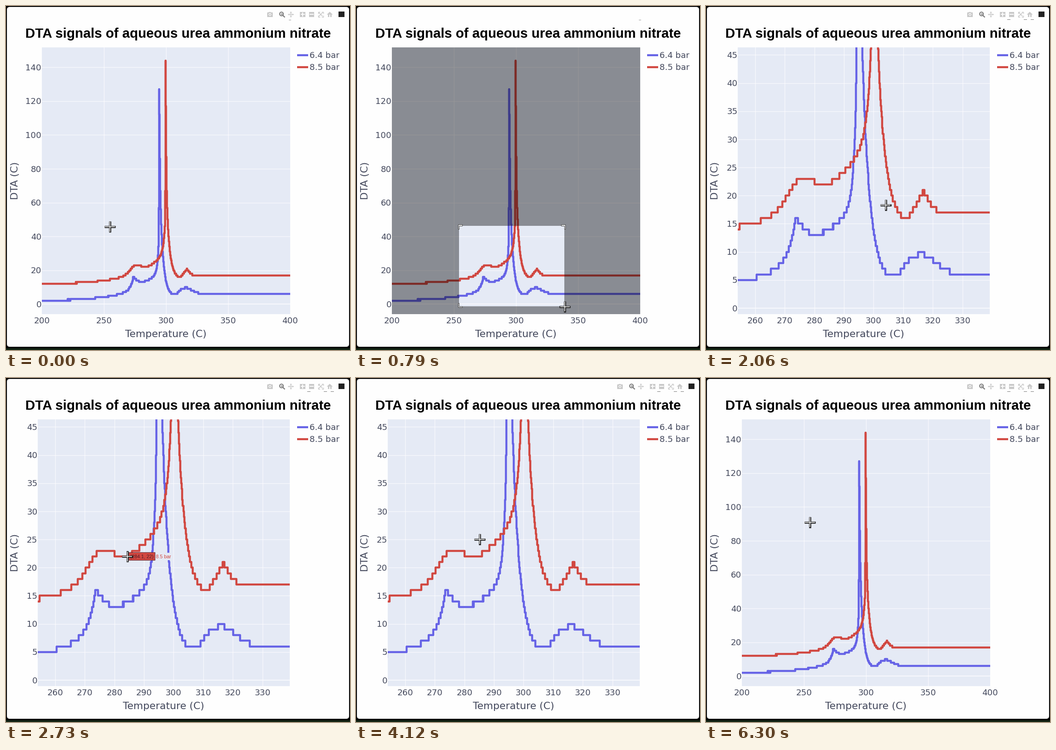
A matplotlib script for the animation above (6.33 s loop, 748 px wide and 748 px high).

```python
import numpy as np
import matplotlib.pyplot as plt
from matplotlib.animation import FuncAnimation
from matplotlib.patches import Circle, FancyBboxPatch, PathPatch, Polygon, Rectangle
from matplotlib.path import Path

SIZE, DPI = 748, 64
PT = 72 / DPI  # points per pixel
STEP, LOOP = 30, 6330
RELEASE, RESET = 1200, 5250

BLUE, RED, INK = "#6663e6", "#d14841", "#43485c"
PLOT, PANEL, GREY, MID = "#e5eaf5", "#fefefe", "#c9c9c9", "#7b7b7b"

fig = plt.figure(figsize=(SIZE / DPI, SIZE / DPI), dpi=DPI, facecolor="black")
ax = fig.add_axes([0, 0, 1, 1])
ax.set(xlim=(0, SIZE), ylim=(SIZE, 0))
ax.axis("off")


def line(xs, ys, color, width, z=2, **kw):
    return ax.plot(xs, ys, color=color, lw=width * PT, zorder=z, **kw)[0]


def rect(x, y, w, h, color, z=1):
    return ax.add_patch(Rectangle((x, y), w, h, fc=color, lw=0, zorder=z))


def disc(x, y, r, color, z):
    return ax.add_patch(Circle((x, y), r, fc=color, lw=0, zorder=z))


def text(x, y, s, size, color=INK, ha="left", family="DejaVu Sans", z=4, **kw):
    return ax.text(x, y, s, fontsize=size * PT, color=color, ha=ha,
                   va="baseline", family=family, zorder=z, **kw)


def closed(*polys):
    return Path.make_compound_path(
        *[Path(list(p) + [p[0]], closed=True) for p in polys])


def box(x0, y0, x1, y1):
    return [(x0, y0), (x1, y0), (x1, y1), (x0, y1)]


# ---- signals ----

TEMPS = np.arange(200, 400, .05)
rng = np.random.default_rng(4)


def bump(mid, height, left, right, power):
    d = TEMPS - mid
    return height * np.exp(-np.abs(d / np.where(d < 0, left, right)) ** power)


def signal(apex, low, rise, shoulder, dip, lift, lift_at, fall, hump):
    """Exponential run-up and cooling around a sharp apex, read in whole degrees."""
    d = TEMPS - apex
    up, down = np.minimum(d, 0), np.maximum(d, 0)
    heating = low + sum(h * np.exp(up / w) for h, w in rise) + bump(*shoulder)
    cooling = (dip + lift / (1 + np.exp((lift_at - TEMPS) / .8))
               + sum(h * np.exp(-down / w) for h, w in fall) + bump(*hump))
    noise = np.repeat(rng.normal(0, .035, len(TEMPS) // 5), 5)
    return np.rint(np.where(d < 0, heating, cooling) + noise).astype(int)


blue = signal(
    apex=294.45, low=1.9, rise=[(17.1, 21.7), (27.6, .98), (80, .12)],
    shoulder=(273.7, 7.9, 2.2, 5.6, 1), dip=4.1, lift=1.9, lift_at=309.3,
    fall=[(75, 2.7), (48, .55)], hump=(316.1, 3.55, 6.9, 6.9, 2))
red = signal(
    apex=299.6, low=11.5, rise=[(18.9, 24.3), (22.7, 1.43), (91, .12)],
    shoulder=(275.3, 4.6, 6.1, 6.1, 2), dip=14.6, lift=2.4, lift_at=312.7,
    fall=[(60, 2.75), (69, .5)], hump=(316.8, 3.6, 2.6, 2.6, 1.4))
SIGNALS = [(blue, BLUE, "6.4 bar"), (red, RED, "8.5 bar")]


# ---- page ----

ax.add_patch(FancyBboxPatch((8, 8), 732, 727, fc=PANEL, lw=0, zorder=0,
                            boxstyle="round,pad=6,rounding_size=6"))
line([0, SIZE], [745.5, 745.5], "#28502b", 1.5)
text(374, 69, "DTA signals of aqueous urea ammonium nitrate", 29.4, "black",
     "center", "Liberation Sans", weight="bold")
text(26, 379.5, "DTA (C)", 21.8, ha="center", rotation=90, rotation_mode="anchor")
for y, (_, color, label) in zip((106.5, 132.5), SIGNALS):
    line([633, 657], [y, y], color, 4.4, solid_capstyle="butt")
    text(660.5, y + 6.6, label, 18.2)


# ---- the two zoom levels ----

def full_xy(t, v):
    return 78 + 2.7 * (t - 200), 648.2 - 3.678 * v


def zoom_xy(t, v):
    return 364.5 + 6.44 * (t - 300), 657 - 12.235 * v


def view(to_xy, x0, x1, xticks, yticks, right, middle):
    bg = rect(x0, 90, x1 - x0, 580, PLOT)
    parts = [bg, text(middle, 720, "Temperature (C)", 21.8, ha="center")]
    for t in xticks:
        x = to_xy(t, 0)[0]
        parts.append(text(x, 689.5, str(t), 18.2, ha="center"))
        if x0 + 2 < x < x1 - 2:
            parts.append(line([x, x], [90, 670], "white", 1.4, alpha=.7))
    for v in yticks:
        y = to_xy(0, v)[1]
        parts.append(text(right, y + 6.6, str(v), 18.2, ha="right"))
        parts.append(line([x0, x1], [y, y], "white", 1.4 if v else 2, alpha=.7))
    for vals, color, _ in SIGNALS:
        keep = np.flatnonzero(np.diff(vals, prepend=-1))
        keep = np.append(keep, len(vals) - 1)
        curve = line(*to_xy(TEMPS[keep], vals[keep]), color, 4.4, 3,
                     drawstyle="steps-post", solid_joinstyle="round")
        curve.set_clip_path(bg)
        parts.append(curve)
    return parts


full = view(full_xy, 78, 618, range(200, 401, 50), range(0, 141, 20), 77, 347.5)
zoom = view(zoom_xy, 69, 617, range(260, 331, 10), range(0, 46, 5), 68.5, 343)

# leftovers of covered text above the title
before = [line([615, 619], [29.5, 29.5], "#999", 1)]
after = [line([x, x + 6], [29, 29], MID, 1) for x in (655, 691, 706)]


# ---- toolbar ----

def plus(x, y, r, color, width):
    return [line([x - r, x + r], [y, y], color, width, 6),
            line([x, x], [y - r, y + r], color, width, 6)]


CY = 18.4
bar = [
    rect(568, 14, 12, 9.5, GREY, 5), rect(571.5, 12.5, 5, 2, GREY, 5),
    disc(574, CY, 3, PANEL, 6), disc(574, CY, 1.7, GREY, 7),
    disc(599, 17.3, 5, MID, 5), disc(599, 17.3, 3, PANEL, 5.5),
    line([602, 605.5], [20.3, 23.8], MID, 2.3, 5),
    *plus(599, 17.3, 1.8, MID, 1),
    *plus(619.5, CY, 5, GREY, 1.4),
    rect(639.5, 12.8, 11.5, 11.5, GREY, 5), *plus(645.2, CY, 3.5, PANEL, 2),
    rect(658.8, 12.8, 11.5, 11.5, GREY, 5),
    line([661, 668], [CY, CY], PANEL, 2, 6),
    ax.add_patch(Polygon([(697.5, 18.6), (704, 12.6), (710.5, 18.6)],
                         fc=GREY, lw=0, zorder=5)),
    rect(699.7, 18, 3, 6, GREY, 5), rect(705.2, 18, 3, 6, GREY, 5),
    rect(723, 12, 13, 12, "#222222", 5),
]
for mark, dx, dy in [("<", -5, 0), (">", 5, 0), ("^", 0, -5), ("v", 0, 5)]:
    bar.append(line([619.5 + dx], [CY + dy], GREY, 0, 6, marker=mark,
                    ms=4 * PT, mew=0))
for sx in (-1, 1):
    bar.append(line([684.3 - 3.7 * sx, 684.3 + 3.7 * sx], [CY - 3.7, CY + 3.7], GREY, 1.5, 5))
    for sy in (-1, 1):
        x, y = 684.3 + 5.5 * sx, CY + 5.5 * sy
        bar.append(line([x - 3 * sx, x, x], [y, y, y - 3 * sy], GREY, 1.4, 5))


# ---- selection, hover label, cursor ----

dim = ax.add_patch(PathPatch(closed(box(0, 0, 1, 1)), fc="black", lw=0, zorder=8))
corners = ax.add_patch(PathPatch(closed(box(0, 0, 1, 1)), fc="white", ec="#444",
                                 lw=PT, zorder=9))

name_bg = rect(0, 0, 37, 16, PLOT, 8)
tag = ax.add_patch(Polygon(box(0, 0, 1, 1), ec="#5a2a35", lw=PT, zorder=9))
value = text(0, 0, "", 10.5, "#4f1d26", "center", "Liberation Sans", 10)
name = text(0, 0, "", 10.5, family="Liberation Sans", z=10)
hover = [name_bg, tag, value, name]

cross = [(line([], [], color, w, 12, solid_capstyle="butt"), r, upright)
         for color, w, r in (("#1c1c1c", 4.5, 12), ("white", 1.5, 10.6))
         for upright in (False, True)]

START, END = np.array([226, 480]), np.array([454.5, 653.5])
# time, x, y of the turns made while reading the zoomed plot
TURNS = np.array([(1250, *END), (2060, 389, 427), (2650, 258, 394),
                  (3330, 305, 347), (3560, 328, 325), (4000, 275, 356),
                  (4900, 226, 313.5)]).T


def pointer(t):
    if t < TURNS[0, 0]:
        left = 1 - np.clip((t - 30) / 650, 0, 1)
        return START + (END - START) * (1 - left ** np.array([2.3, 3.7]))
    return np.array([np.interp(t, TURNS[0], TURNS[k]) for k in (1, 2)])


def show(parts, on):
    for p in parts:
        p.set_visible(on)


def draw_selection(t):
    x0, y0 = START - (1.7, 2.5)
    x1, y1 = pointer(t - 32) - (1.5, 1)
    on = t < RELEASE and x1 - x0 > 6
    show([dim, corners], on)
    if not on:
        return
    dim.set_path(closed(box(78, 90, 618, 670), box(x0, y0, x1, y1)[::-1]))
    dim.set_alpha(.4 * np.interp(t, [45, 190], [0, 1]))
    arm = min(7, (x1 - x0) / 3, (y1 - y0) / 3)
    bracket = [(-2.5, -2.5), (arm, -2.5), (arm, 0), (0, 0), (0, arm), (-2.5, arm)]
    corners.set_path(closed(*[
        [(x + sx * a, y + sy * b) for a, b in bracket]
        for x, sx in ((x0, 1), (x1, -1)) for y, sy in ((y0, 1), (y1, -1))]))


def draw_hover(x, y, zoomed):
    reach, hit = 14, None
    for vals, color, label in SIGNALS:
        xs, ys = zoom_xy(TEMPS, vals)
        d = np.hypot(xs - x, ys - y)
        i = d.argmin()
        if zoomed and d[i] < reach:
            reach, hit = d[i], (xs[i], ys[i], TEMPS[i], vals[i], color, label)
    show(hover, hit is not None)
    if hit is None:
        return
    px, py, temp, val, color, label = hit
    left, right = px + 5, px + 62
    tag.set_xy([(px, py), (left, py - 4), (left, py - 8.5), (right, py - 8.5),
                (right, py + 8.5), (left, py + 8.5), (left, py + 4)])
    tag.set_facecolor(color)
    value.set_text(f"({temp:.1f}, {val})")
    value.set_position(((left + right) / 2, py + 3.8))
    name.set_text(label)
    name.set_color(color)
    name.set_position((right + 2, py + 3.8))
    name_bg.set_xy((right, py - 8))


def update(i):
    t = i * STEP
    zoomed = RELEASE <= t < RESET
    show(zoom, zoomed)
    show(full, not zoomed)
    show(before, t < RELEASE)
    show(after, t >= RELEASE)

    fade = np.interp(t, [30, 240, RELEASE, RELEASE + 210], [1, 0, 0, 1])
    for part in bar:
        part.set_alpha(fade)

    x, y = pointer(t)
    draw_selection(t)
    draw_hover(x - 1.5, y - 2, zoomed)
    for arm, r, upright in cross:
        if upright:
            arm.set_data([x, x], [y - r, y + r])
        else:
            arm.set_data([x - r, x + r], [y, y])
    return []


anim = FuncAnimation(fig, update, frames=LOOP // STEP, interval=STEP,
                     repeat=True, repeat_delay=0)
plt.show()
```
